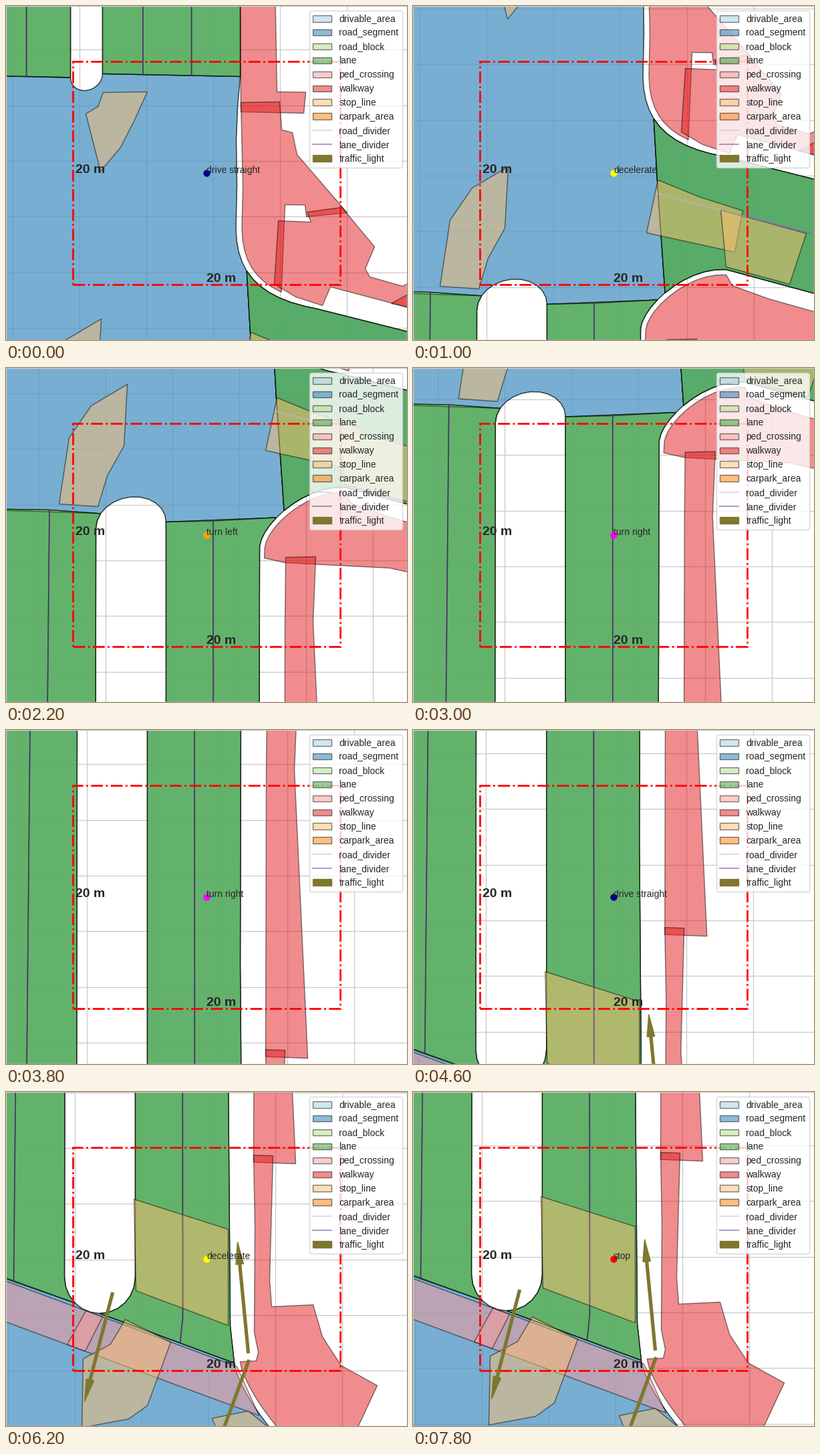
These frames come from a looping animation (600x500 px, 8000 ms). A matplotlib script:

```python
import numpy as np
import matplotlib.pyplot as plt
from matplotlib.animation import FuncAnimation
from matplotlib.lines import Line2D
from matplotlib.patches import Arrow, Patch, Polygon, Rectangle

plt.rcParams["font.family"] = "Liberation Sans"
plt.rcParams["text.color"] = "0.15"

W, H = 600, 500
FRAMES, STEP_MS = 40, 200
COLORS = {
    "drivable_area": "#a6cee3",
    "road_segment": "#1f78b4",
    "road_block": "#b2df8a",
    "lane": "#33a02c",
    "ped_crossing": "#fb9a99",
    "walkway": "#e31a1c",
    "stop_line": "#fdbf6f",
    "carpark_area": "#ff7f00",
    "road_divider": "#cab2d6",
    "lane_divider": "#6a3d9a",
    "traffic_light": "#7e772e",
}
LAYERS = list(COLORS)
DOTS = {"drive straight": "darkblue", "decelerate": "yellow",
        "turn left": "orange", "turn right": "magenta", "stop": "red"}
ACTIONS = {0: "drive straight", 4: "decelerate", 7: "turn left",
           14: "turn right", 22: "drive straight", 24: "decelerate",
           34: "stop"}

# Waypoints of the drive
TIMES = [0, 5, 11, 19, 27, 31, 39]
AHEAD = [0, 228, 444, 764, 1091, 1148, 1152]
ASIDE = [0, 0, 39, 11, -7, -7, -7]


def glide(values):
    """Smooth path through the waypoints, without overshoot, per frame."""
    x, y = np.array(TIMES, float), np.array(values, float)
    h = np.diff(x)
    k = np.diff(y) / h
    inner = [2 * a * b / (a + b) if a * b > 0 else 0 for a, b in zip(k, k[1:])]
    v = np.array([k[0], *inner, k[-1]])
    t = np.arange(FRAMES)
    i = np.clip(np.searchsorted(x, t, "right") - 1, 0, len(h) - 1)
    s = (t - x[i]) / h[i]
    return (y[i] + s * s * (3 - 2 * s) * (y[i + 1] - y[i])
            + s * (1 - s) * h[i] * ((1 - s) * v[i] - s * v[i + 1]))


ahead, aside = glide(AHEAD), glide(ASIDE)


def bezier(*ctrl, n=12):
    a, b, c, d = np.array(ctrl, float)
    t = np.linspace(0, 1, n)[:, None]
    u = 1 - t
    return list(u**3 * a + 3 * u * u * t * b + 3 * u * t * t * c + t**3 * d)


def cap(a, b, depth, n=13):
    """Half ellipse from a to b, bulging vertically."""
    t = np.linspace(0, np.pi, n)
    f = (1 - np.cos(t)) / 2
    x = a[0] + f * (b[0] - a[0])
    y = a[1] + f * (b[1] - a[1]) + depth * np.sin(t)
    return list(zip(x, y))


def offset(curve, d):
    p = np.array(curve)
    g = np.gradient(p, axis=0)
    normal = np.c_[g[:, 1], -g[:, 0]] / np.hypot(*g.T)[:, None]
    return list(p + d * normal)


fig = plt.figure(figsize=(W / 100, H / 100), dpi=100, facecolor="white")
ax = fig.add_axes([0, 0, 1, 1])
ax.set_axisbelow(True)
ax.set_xticks(np.arange(-191, 1000, 100))
ax.set_yticks(64.7 + 250 / 3 * np.arange(-2, 24))
ax.tick_params(length=0, labelleft=False, labelbottom=False)
ax.grid(color="0.8", lw=1)
for spine in ax.spines.values():
    spine.set(color="0.8", lw=1)


def area(layer, *pts):
    ax.add_patch(Polygon(pts, fc=COLORS[layer], ec="black", lw=1, alpha=0.5,
                         zorder=1 + 0.05 * LAYERS.index(layer)))


def line(layer, *pts):
    ax.plot(*zip(*pts), color=COLORS[layer], lw=1.5, alpha=0.5,
            zorder=2 + 0.01 * LAYERS.index(layer))


def road(*pts):
    area("drivable_area", *pts)
    area("road_segment", *pts)


def lanes(*chains):
    """Lanes between neighbouring boundaries, each listed top to bottom."""
    whole = chains[0] + chains[-1][::-1]
    road(*whole)
    area("road_block", *whole)
    for a, b in zip(chains, chains[1:]):
        area("lane", *a, *b[::-1])
    for c in chains[1:-1]:
        line("lane_divider", *c)


def far(x, gap=0):
    """Point on the slanted edge of the second junction."""
    return x, 1431 + 0.37 * (x - 18) + gap


def crossing(x0, x1, x2, x3):
    area("ped_crossing", far(x0, 4), far(x1, 4), far(x2, 65), far(x3, 65))


# Kerbs and traffic islands
ne = bezier((343.5, 332), (344, 404), (384, 438), (465, 453))
se = bezier((340, 710), (344, 676), (408, 618), (468, 622))
south = bezier((348, 1553), (352, 1580), (378, 1622), (403, 1652))
island_n = cap((96, 107), (144, 101), 22)
island_top = cap((95, 683), (200, 674), -42)
island_end = cap((94, 1425), (200, 1425), 54)

# Northern lanes
for y0, edges in [(104.4, (-150, 30, 96)), (98, (144, 204.5, 277, 350))]:
    lanes(*[[(x, -40), (x, y0 + 0.02 * x)] for x in edges])

# First junction
road((-150, 104), (30, 105), *island_n, (350, 105), (346, 150), (344, 200),
     (345, 268), *ne[:5], (365, 488), *se[5:3:-1], (270.5, 672.5),
     *island_top[:1:-1], (25.5, 656), (-150, 653))

# Eastern road
east = ne[4:] + [(660, 502), (660, 674)] + se[:4:-1] + [(365, 488)]
road(*east)
for layer in ("road_segment", "road_block", "lane"):
    area(layer, *east)
line("road_divider", (363, 508), (660, 585))
line("lane_divider", (500, 543.5), (660, 585))

# Southern lanes
lanes([(-150, 653), far(-150)], [(25.5, 656), far(18)],
      island_top[2::-1] + island_end[:4])
lanes([(200, 674)] + island_end[:5:-1],
      [(270.5, 672.5), (271, 1485), far(267)],
      se[4::-1] + [(339, 1114), (342, 1498), far(348)])

# Second junction
road(far(-150), far(18), *island_end[3:7], far(267), *south,
     (440, 1720), (-150, 1720))
crossing(-150, 352, 385, -150)
crossing(126, 151, 125, 98)

# Walkways
area("walkway", (350, -40), (402, -40), (405, 128), (448, 128.5),
     (445, 160), (351, 158))
area("walkway", (351, 144), (354, 268), *offset(ne, 9)[:9], (417, 297),
     (447, 297.5), (449, 315), (510, 309), (435, 222), (428, 189),
     (412, 185), (409, 143))
area("walkway", (407, 321), (456, 323), (450, 308), (502, 301), (551, 360),
     (537, 393), (544, 405), (593, 419), (660, 382), (660, 467), (587, 447),
     (485, 420), (473, 448), (433, 435), (401, 416))
area("walkway", (576, 445), (660, 398), (660, 467), (587, 447))
area("walkway", (347, 728), *offset(se, -8), (477, 646), (532, 666),
     (660, 702), (660, 771), (535, 743), (378, 735))
area("walkway", (379, 727), (424, 726), (420, 824), (440, 1255),
     (377, 1252.5), (378, 824))
area("walkway", *offset(south, 9), (460, 1720), (500, 1720), (562, 1587),
     (508, 1557), (480, 1514), (466, 1466), (404, 1469), (401, 1429),
     (406, 1243), (377, 1242), (379, 1350), (378, 1507), (384, 1537),
     (381, 1550))

# Stop areas
area("stop_line", (145, 129), (211, 128), (191, 172), (171, 211),
     (141, 247), (119, 161), (137, 150))
area("stop_line", (142, 468), (137, 560), (112, 605), (98, 651), (40, 647),
     (55, 548), (88, 500))
area("stop_line", (366, 488), (427, 513), (493, 534), (481, 596), (349, 567))
area("stop_line", (460, 533), (588, 568), (563, 644), (468, 618))
area("stop_line", (198, 1308), (339, 1353), (339, 1497), (201, 1445))
area("stop_line", (185, 1488), (253, 1522), (218, 1617), (190, 1637),
     (120, 1650), (122, 1547), (163, 1525))
area("stop_line", (315, 1636), (369, 1625), (402, 1652), (340, 1700))

# Traffic lights: foot and direction
for x, y, dx, dy in [(166, 1448, -42, 163), (369, 1538, -16, -166),
                     (370, 1549, -58, 157)]:
    ax.add_patch(Arrow(x, y, dx, dy, width=19, lw=1,
                       color=COLORS["traffic_light"], zorder=2.4))

# Fixed overlay
hud = fig.add_axes([0, 0, 1, 1])
hud.set(xlim=(0, W), ylim=(H, 0))
hud.axis("off")
hud.add_patch(Rectangle((W / 6, H * 5 / 6), W * 2 / 3, -H * 2 / 3,
                        fill=False, ec="red", lw=2, ls="-."))
for x, y in [(104, 250), (300, 413.3)]:
    hud.text(x, y, "20 m", fontsize=14, weight="bold")
dot, = hud.plot([W / 2], [H / 2], "o", ms=7.5, mew=0)
label = hud.text(W / 2, H / 2, "", fontsize=10)


def handle(name):
    color = COLORS[name]
    if name.endswith("_divider"):
        return Line2D([], [], color=color, alpha=0.5, lw=1.5)
    if name == "traffic_light":
        return Patch(color=color)
    return Patch(fc=color, ec="black", lw=1, alpha=0.5)


hud.legend([handle(n) for n in LAYERS], LAYERS, loc="upper right",
           fontsize=10, facecolor="white", framealpha=0.8, edgecolor="0.8")


def update(i):
    # Half a pixel puts map points on pixel centres
    left, top = -aside[i] - 0.5, ahead[i] - 0.5
    ax.set_xlim(left, left + W)
    ax.set_ylim(top + H, top)
    action = ACTIONS[max(k for k in ACTIONS if k <= i)]
    label.set_text(action)
    dot.set_color(DOTS[action])
    return dot, label


anim = FuncAnimation(fig, update, frames=FRAMES, interval=STEP_MS,
                     repeat=True, repeat_delay=0, blit=False)
plt.show()
```
